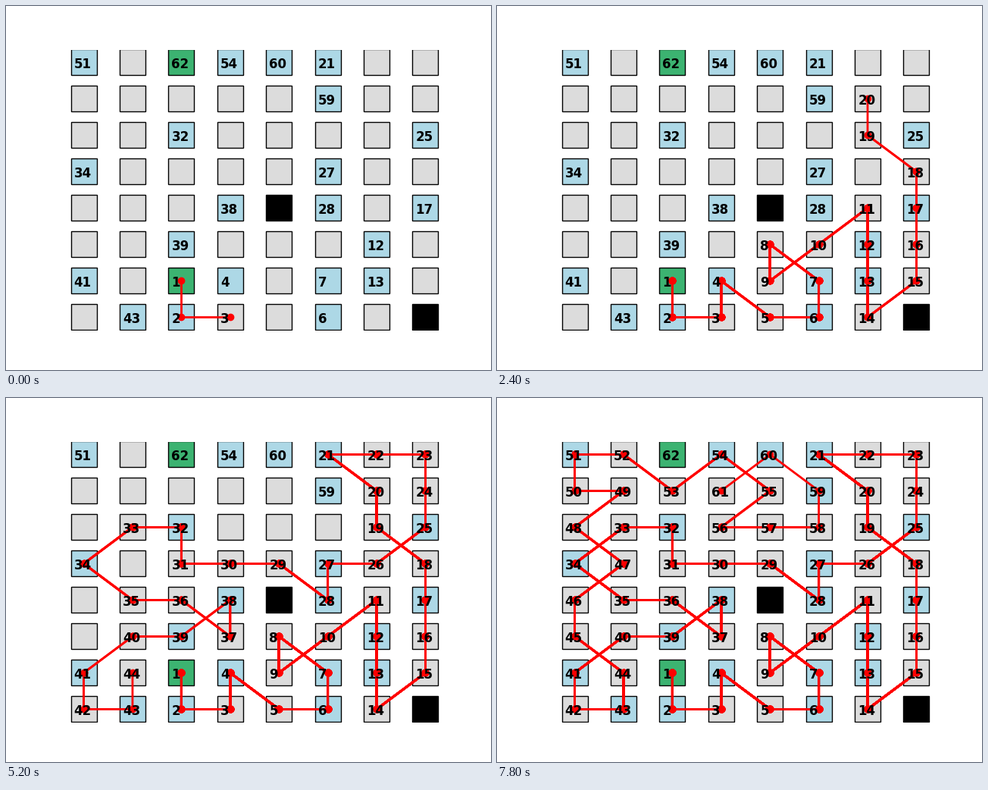
These frames come from a looping animation (640x480 px, 8.2 s). A matplotlib script:

```python
import matplotlib.pyplot as plt
from matplotlib.animation import FuncAnimation

# The puzzle: clues, open cells (.) and blocked cells (#), top row first.
PUZZLE = """
51  .  62  54  60  21  .   .
.   .  .   .   .   59  .   .
.   .  32  .   .   .   .   25
34  .  .   .   .   27  .   .
.   .  .   38  #   28  .   17
.   .  39  .   .   .   12  .
41  .  1   4   .   7   13  .
.   43 2   .   .   6   .   #
"""
ROWS = [line.split() for line in PUZZLE.split("\n") if line][::-1]
SIZE = len(ROWS)
MARKS = {(x, y): ROWS[y][x]
         for x in reversed(range(SIZE)) for y in reversed(range(SIZE))}
CELLS = [cell for cell, mark in MARKS.items() if mark != "#"]
CLUES = {int(mark): cell for cell, mark in MARKS.items() if mark.isdigit()}
LAST = len(CELLS)
STEPS = [n for n in range(1, LAST + 1) if n not in CLUES]
FRAMES, INTERVAL = len(STEPS) + 2, 200


def dist(a, b):
    return max(abs(a[0] - b[0]), abs(a[1] - b[1]))


def fits(n, cell):
    return all(dist(cell, spot) <= abs(n - m) and (cell == spot) == (n == m)
               for m, spot in CLUES.items())


REACH = {n: [c for c in CELLS if fits(n, c)] for n in range(1, LAST + 1)}
LATEST = {c: max(n for n in REACH if c in REACH[n]) for c in CELLS}


def solve(path):
    """Extend the path of neighbouring cells until it fills the board."""
    n = len(path) + 1
    if n > LAST:
        return path
    # Give up when a cell was left empty past its last chance.
    if any(LATEST[c] < n and c not in path for c in CELLS):
        return None
    for cell in REACH[n]:
        if dist(cell, path[-1]) == 1 and cell not in path:
            found = solve(path + [cell])
            if found:
                return found
    return None


def cell_color(mark):
    if mark == "#":
        return "black"
    if mark in ("1", str(LAST)):
        return "mediumseagreen"
    return "lightblue" if mark.isdigit() else "gainsboro"


fig, ax = plt.subplots(figsize=(6.4, 4.8), dpi=100)
ax.set_position([0.125, 0.11, 0.775, 0.77])
limits = (-0.35, SIZE - 0.65)
ax.set(xlim=limits, ylim=limits)
ax.axis("off")

for (x, y), mark in MARKS.items():
    ax.plot(x, y, "s", ms=25, mfc=cell_color(mark), mec="black", mew=1)

path = solve([CLUES[1]])
labels = {n: ax.text(x - 0.2, y - 0.15, str(n), size=12, weight="bold",
                     family="DejaVu Sans")
          for n, (x, y) in enumerate(path, 1)}

# Each step lays the whole path so far over the earlier ones,
# so older stretches look heavier.
trails = []
for n in STEPS:
    trails += ax.plot(*zip(*path[:n]), "o-", color="red", lw=2, ms=6)


def update(frame):
    step = min(max(frame - 1, 0), len(STEPS) - 1)
    for i, trail in enumerate(trails):
        trail.set_visible(i <= step)
    for n, label in labels.items():
        label.set_visible(n in CLUES or n <= STEPS[step])
    return trails + list(labels.values())


anim = FuncAnimation(fig, update, frames=FRAMES, interval=INTERVAL,
                     init_func=lambda: update(0), repeat=True,
                     repeat_delay=0)
plt.show()
```
